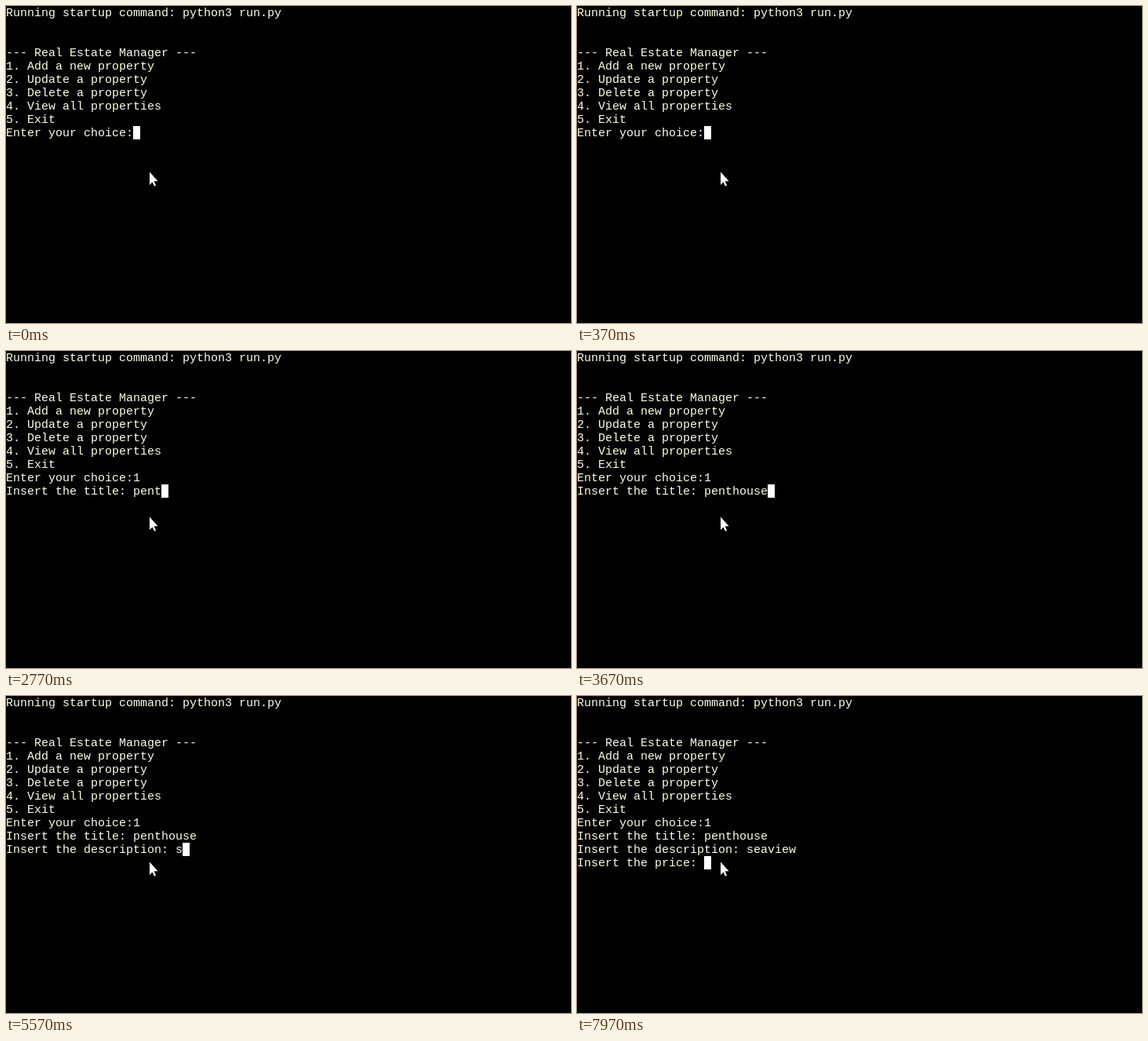
Recreate the animation shown at these times as an HTML page. Size 720 by 404 pixels, loop 8 s.

```html
<!DOCTYPE html>
<html lang="en">
<head>
<meta charset="utf-8">
<title>Terminal session</title>
<style>
  html, body {
    margin: 0;
    width: 100%;
    height: 100%;
    overflow: hidden;
    background: #000;
  }
  #term {
    position: absolute;
    left: 0;
    top: 1px;
    margin: 0;
    color: #ffffe6;
    font: 15px/17px "Liberation Mono", "Courier New", monospace;
    font-variant-ligatures: none;
  }
  #caret {
    position: absolute;
    left: 0;
    top: 0;
    width: 9px;
    height: 17px;
    background: #fff;
  }
  #pointer {
    position: absolute;
    left: 182px;
    top: 211px;
  }
</style>
</head>
<body>
<pre id="term"></pre>
<div id="caret"></div>
<svg id="pointer" width="13" height="20">
  <path d="M1 .5V17L4.5 13.5 7 18.7 9 17.8 6.7 12.3H11.5Z" fill="#fff"/>
</svg>
<script>
  const LOOP = 8000, CELL_W = 9, CELL_H = 17;

  const intro = [
    "Running startup command: python3 run.py",
    "",
    "",
    "--- Real Estate Manager ---",
    "1. Add a new property",
    "2. Update a property",
    "3. Delete a property",
    "4. View all properties",
    "5. Exit",
    "Enter your choice:"
  ].join("\n");

  // Each key press: time in ms and the text it puts on screen.
  const keys = [];
  const type = (word, times) => times.forEach((at, i) => keys.push([at, word[i]]));
  const enter = (at, prompt) => keys.push([at, "\n" + prompt]);

  type("1", [630]);
  enter(1400, "Insert the title: ");
  type("penthouse", [2300, 2400, 2530, 2730, 3230, 3300, 3400, 3500, 3670]);
  enter(4300, "Insert the description: ");
  type("seaview", [5570, 5770, 5970, 6530, 6970, 7070, 7230]);
  enter(7930, "Insert the price: ");

  const term = document.getElementById("term");
  const caret = document.getElementById("caret");
  let shown = "";

  function draw() {
    const t = performance.now() % LOOP;
    const text = keys.reduce((s, [at, add]) => at <= t ? s + add : s, intro);
    if (text !== shown) {
      shown = text;
      term.textContent = text;
      const lines = text.split("\n");
      const row = lines.length - 1;
      caret.style.transform =
        `translate(${lines[row].length * CELL_W}px, ${row * CELL_H}px)`;
    }
    requestAnimationFrame(draw);
  }
  draw();
</script>
</body>
</html>
```
